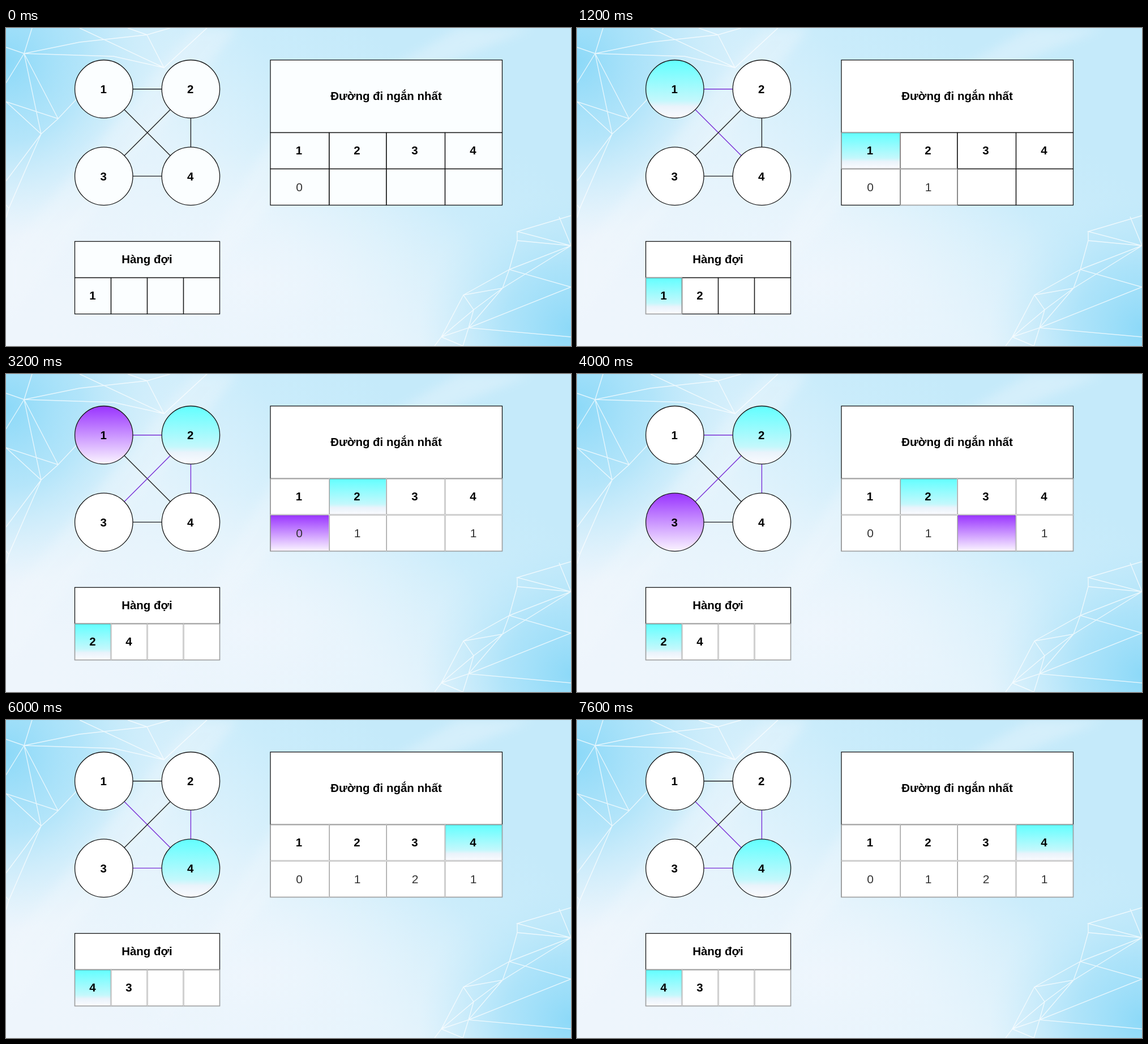
These frames come from a looping animation (998x561 px, 8000 ms). An HTML page:

```html
<!DOCTYPE html>
<html lang="vi">
<head>
<meta charset="utf-8">
<title>BFS</title>
<style>
  html, body { margin: 0; width: 100%; height: 100%; overflow: hidden; background: #d9f0fb; }
  svg { display: block; width: 100vw; height: 100vh; }
  text { font: bold 20.48px "Liberation Sans", Arial, sans-serif; text-anchor: middle; }
  .dist { font-weight: normal; font-size: 21px; fill: #333; }
  .line { fill: none; stroke: #161616; stroke-width: 1.3; }
  .edge { stroke-width: 1.4; }
  .used { fill: none; stroke: #fff; stroke-width: 1.3; opacity: .6; }
  .mesh { fill: none; stroke: #fff; stroke-width: 1.4; opacity: .72; }
</style>
</head>
<body>
<svg viewBox="0 0 998 561" preserveAspectRatio="none">
  <defs>
    <linearGradient id="cyan" x2="0" y2="1">
      <stop offset="0" stop-color="#62ffff"/>
      <stop offset=".7" stop-color="#c4f8fc"/>
      <stop offset=".8" stop-color="#e9f3fb"/>
      <stop offset="1" stop-color="#fbfbfe"/>
    </linearGradient>
    <linearGradient id="purple" x2="0" y2="1">
      <stop offset="0" stop-color="#9933ff"/>
      <stop offset="1" stop-color="#fbf5ff"/>
    </linearGradient>
    <linearGradient id="sky" gradientUnits="userSpaceOnUse" x1="190" y1="560" x2="640" y2="0">
      <stop offset="0" stop-color="#eef5fc"/>
      <stop offset=".45" stop-color="#e3f3fc"/>
      <stop offset=".8" stop-color="#caecfb"/>
      <stop offset="1" stop-color="#c5eafa"/>
    </linearGradient>
    <radialGradient id="corner">
      <stop offset="0" stop-color="#8cd9f8"/>
      <stop offset=".45" stop-color="#a3e0f9" stop-opacity=".75"/>
      <stop offset="1" stop-color="#c5eafa" stop-opacity="0"/>
    </radialGradient>
    <radialGradient id="glow">
      <stop offset="0" stop-color="#eff6fd" stop-opacity=".9"/>
      <stop offset="1" stop-color="#eaf5fc" stop-opacity="0"/>
    </radialGradient>
    <filter id="soft"><feGaussianBlur stdDeviation="9"/></filter>
  </defs>
  <rect width="998" height="561" fill="url(#sky)"/>
  <ellipse cx="430" cy="450" rx="420" ry="240" fill="url(#glow)"/>
  <ellipse cx="0" cy="60" rx="300" ry="310" fill="url(#corner)"/>
  <ellipse cx="1000" cy="530" rx="270" ry="250" fill="url(#corner)"/>
  <g fill="#f2f8fd" opacity=".35" filter="url(#soft)">
    <path d="M0 400L330 0H410L0 520Z"/>
    <path d="M250 561L640 120L930 0H800L470 190Z"/>
  </g>
  <path class="mesh" d="M46 0L32 45L0 34M0 97L32 45L62 187L92 160L32 45L130 25L249 12L215 0
    M290 0L249 12L279 70L355 0M32 45L190 50L279 70L130 0M0 130L92 160L125 125
    M0 130L62 187L5 318L0 335M62 187L0 270M0 312L5 318"/>
  <path class="mesh" d="M998 331L903 359L998 384L903 375V359M903 375L889 426L808 471L877 459L889 426L998 457
    M977 333L998 384L889 426M998 384L877 459L817 529L769 545L808 471L826 497L769 545L757 561
    M826 497L817 529L998 545M826 497L877 459M817 529L998 457M817 529L807 561L769 545"/>
  <g id="scene"></g>
</svg>
<script>
const STEP = 400, LOOP = 8000;
const links = [[1, 2], [1, 4], [2, 3], [2, 4], [3, 4]];
const nodes = { 1: [172.8, 107.7], 2: [326.4, 107.7], 3: [172.8, 261.4], 4: [326.4, 261.4] };
const cols = [467, 570.8, 671.8, 775.5, 876.5];
const textX = [517.5, 620, 722, 825];
const neighbours = n => [1, 2, 3, 4].filter(m => links.some(l => l.includes(n) && l.includes(m) && n !== m));

// Breadth-first search from node 1, one snapshot per step
function search() {
  const steps = [], queue = [1], dist = { 1: 0 }, used = new Set();
  const snap = (current, looking) => {
    if (current) used.add('h' + current).add('q0');
    if (looking) used.add('d' + looking);
    steps.push({ current, looking, queue: [...queue], dist: { ...dist }, used: new Set(used) });
  };
  snap();
  while (queue.length) {
    const n = queue[0];
    if (n !== 1) for (let i = 0; i < 4; i++) used.add('h' + (i + 1)).add('d' + (i + 1)).add('q' + i);
    snap(n);
    for (const m of neighbours(n)) {
      snap(n, m);
      if (!(m in dist)) {
        dist[m] = dist[n] + 1;
        queue.push(m);
      }
      snap(n);
    }
    queue.shift();
    snap();
  }
  return steps.slice(0, LOOP / STEP);
}

const label = (x, y, s, cls = '') => `<text class="${cls}" x="${x}" y="${y + 7.4}">${s}</text>`;
const box = (x, y, w, h, attrs) => `<rect x="${x}" y="${y}" width="${w}" height="${h}" ${attrs}/>`;

function draw(s) {
  const plain = s.current ? '#fff' : '#fbfeff';
  let fills = '', borders = '', greys = '', texts = '';

  const cell = (key, x, y, w, h, fill) => {
    fills += box(x, y, w, h, `fill="${fill || plain}"`);
    borders += box(x, y, w, h, 'class="line"');
    if (s.used.has(key)) greys += box(x, y, w, h, 'class="used"');
  };

  const edges = links.map(([a, b]) => {
    const color = a === s.current || b === s.current ? '#7a2fd6' : '#222';
    return `<path class="edge" stroke="${color}" d="M${nodes[a]}L${nodes[b]}"/>`;
  }).join('');

  let circles = '';
  for (const n of [1, 2, 3, 4]) {
    const [x, y] = nodes[n];
    const fill = n === s.current ? 'url(#cyan)' : n === s.looking ? 'url(#purple)' : plain;
    circles += `<circle class="line" style="fill:${fill}" cx="${x}" cy="${y}" r="51.2"/>` + label(x - .6, y, n);
  }

  cell('', 467, 56.5, 409.5, 128);
  texts += label(671.5, 120, 'Đường đi ngắn nhất');
  cell('', 121.5, 376.5, 256, 64);
  texts += label(249, 408, 'Hàng đợi');

  for (let i = 0; i < 4; i++) {
    const n = i + 1, x = cols[i], w = cols[i + 1] - x;
    cell('h' + n, x, 184.5, w, 64, n === s.current && 'url(#cyan)');
    cell('d' + n, x, 248.5, w, 64, n === s.looking && 'url(#purple)');
    cell('q' + i, 121.5 + 64 * i, 440.5, 64, 64, i === 0 && s.current && 'url(#cyan)');
    texts += label(textX[i], 216, n);
    texts += label(textX[i] + .7, 280.4, s.dist[n] ?? '', 'dist');
    texts += label(153 + 64 * i, 472, s.queue[i] ?? '');
  }
  return edges + circles + fills + borders + greys + texts;
}

const frames = search().map(draw);
const scene = document.getElementById('scene');
let shown = -1;

function render(time) {
  const i = Math.floor((time % LOOP) / STEP);
  if (i !== shown) scene.innerHTML = frames[shown = i];
}

const start = performance.now();
function tick(now) {
  render(Math.max(0, now - start));
  requestAnimationFrame(tick);
}
render(0);
requestAnimationFrame(tick);
</script>
</body>
</html>
```
